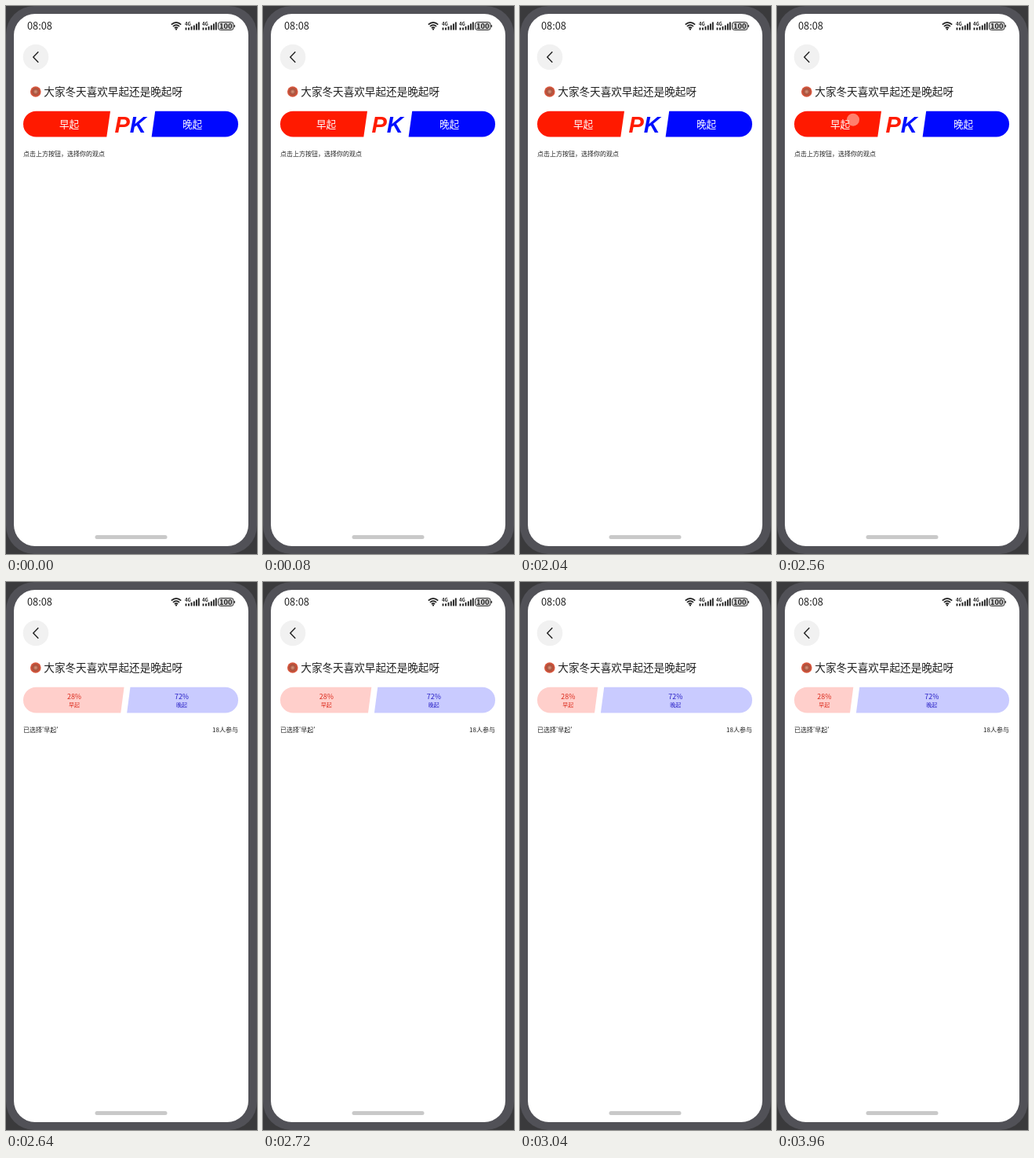
These frames come from a looping animation (320 px wide and 697 px high, 4520 ms). An HTML page:

```html
<!DOCTYPE html>
<html lang="zh-CN">
<head>
<meta charset="utf-8">
<style>
html, body { margin: 0; width: 100%; height: 100%; overflow: hidden; background: #3a3a3c; }
svg { display: block; width: 100%; height: 100%; }
text { font-family: "Noto Sans CJK SC", "Noto Sans CJK", sans-serif; fill: #222; }
.mid { text-anchor: middle; }
.time { font-size: 12.8px; font-weight: 500; }
.tiny { font-size: 6px; font-weight: 700; }
.title { font-size: 13.6px; }
.choice { font-size: 12.6px; fill: #fff; }
.pk { font: italic bold 29px "Liberation Sans", sans-serif; }
.note { font-size: 8px; }
.percent { font-size: 8.9px; font-weight: 500; }
.label { font-size: 7px; font-weight: 500; }
.red { fill: #dc2c1e; }
.blue { fill: #2a22c6; }
</style>
</head>
<body>
<svg viewBox="0 0 320 697" preserveAspectRatio="none">
  <defs>
    <radialGradient id="avatar">
      <stop offset="0" stop-color="#d99a80"/>
      <stop offset=".5" stop-color="#a8503c"/>
      <stop offset="1" stop-color="#e2573c"/>
    </radialGradient>
    <g id="signal">
      <text class="tiny" x="-.5" y="25">4G</text>
      <path d="M1 30.5v-3M4.5 30.5v-3M8 30.5v-4.5M11.3 30.5v-6M14.4 30.5v-8M17.3 30.5v-10" stroke="#222" stroke-width="1.9"/>
    </g>
  </defs>

  <rect width="320" height="697" rx="36" fill="#515157"/>
  <rect x="10" y="10" width="299" height="677" rx="27" fill="#fff"/>

  <text class="time" x="27" y="30.4">08:08</text>
  <g fill="none" stroke="#222" stroke-width="1.7">
    <path d="M210.8 23.6Q217 18 223.2 23.6M212.9 26Q217 22.2 221.1 26M214.9 28.2Q217 26.3 219.1 28.2"/>
    <path d="M216 29.6h2"/>
  </g>
  <use href="#signal" x="228.5"/>
  <use href="#signal" x="250.5"/>
  <rect x="270.5" y="20.5" width="19.5" height="10" rx="2.8" fill="#d4d4d4" stroke="#333"/>
  <path d="M291.4 24v3" stroke="#333" stroke-width="1.3"/>
  <text class="mid" x="280.2" y="29" font-size="9.3" font-weight="700">100</text>

  <circle cx="38" cy="65" r="16.3" fill="#f1f1f1"/>
  <path d="M41.3 58.3L34.8 65l6.5 6.7" fill="none" stroke="#222" stroke-width="1.4"/>

  <circle cx="37.8" cy="109" r="6.8" fill="url(#avatar)"/>
  <text class="title" x="48.3" y="114.1">大家冬天喜欢早起还是晚起呀</text>

  <path id="left"/>
  <path id="right"/>

  <g id="vote">
    <text class="choice mid" x="80.5" y="155.2">早起</text>
    <text class="choice mid" x="237.5" y="155.2">晚起</text>
    <text class="pk" x="138.5" y="160.7" style="fill:#ff1c00">P<tspan fill="#0010ff">K</tspan></text>
    <text class="note" x="22" y="191">点击上方按钮，选择你的观点</text>
    <circle id="touch" cx="97" cy="144.7" r="8" fill="#ffc0b0" opacity=".62"/>
  </g>

  <g id="result">
    <g id="leftText" class="mid">
      <text class="percent red" y="149.4">28%</text>
      <text class="label red" y="158.5">早起</text>
    </g>
    <g id="rightText" class="mid">
      <text class="percent blue" y="149.4">72%</text>
      <text class="label blue" y="158.5">晚起</text>
    </g>
    <text class="note" x="22" y="191">已选择'早起'</text>
    <text class="note" x="296" y="191" text-anchor="end">18人参与</text>
  </g>

  <rect x="113.5" y="673" width="92" height="5" rx="2.5" fill="#c9c9c9"/>
</svg>
<script>
const LOOP = 4520, TOUCH = 2560, CHOSEN = 2640;
const LEFT = 22, RIGHT = 296, TOP = 133.8, BOTTOM = 166.6, RADIUS = (BOTTOM - TOP) / 2;
const STEPS = [2640, 2720, 2800, 2840, 2920, 3000, 3040, 3120];
const el = id => document.getElementById(id);
const show = (id, on) => el(id).setAttribute("visibility", on ? "inherit" : "hidden");

// Each half is a pill end closed by a slanted edge.
function drawHalf(id, end, topX, bottomX, color) {
  const dir = end === LEFT ? 1 : -1;
  const x = end + dir * RADIUS;
  el(id).setAttribute("d", `M${topX} ${TOP}H${x}A${RADIUS} ${RADIUS} 0 0 ${dir > 0 ? 0 : 1} ${x} ${BOTTOM}H${bottomX}Z`);
  el(id).setAttribute("fill", color);
}

// Split eases from the middle to 28%, already under way when it first appears.
function splitAt(time) {
  const s = (time - CHOSEN) / 200;
  const u = Math.min(1, .222 + .4195 * s - .0445 * s * s);
  const eased = time >= STEPS.at(-1) ? 1 : (1 - Math.cos(Math.PI * u)) / 2;
  return LEFT + (RIGHT - LEFT) * (.5 - .22 * eased);
}

function render(time) {
  const chosen = time >= CHOSEN;
  show("vote", !chosen);
  show("result", chosen);
  show("touch", time >= TOUCH && !chosen);
  if (!chosen) {
    drawHalf("left", LEFT, 133, 128.3, "#ff1a00");
    drawHalf("right", RIGHT, 190.2, 185.6, "#0008ff");
    return;
  }
  const split = splitAt(STEPS.findLast(step => step <= time));
  drawHalf("left", LEFT, split - 1.4, split - 5.7, "#ffcfcb");
  drawHalf("right", RIGHT, split + 6.5, split + 2.2, "#c9cbff");
  el("leftText").setAttribute("transform", `translate(${(LEFT + split) / 2})`);
  el("rightText").setAttribute("transform", `translate(${(RIGHT + split) / 2})`);
  for (const id of ["leftText", "rightText"]) el(id).setAttribute("text-anchor", "middle");
}

const start = performance.now();
function tick() {
  render((performance.now() - start) % LOOP);
  requestAnimationFrame(tick);
}
tick();
</script>
</body>
</html>
```
